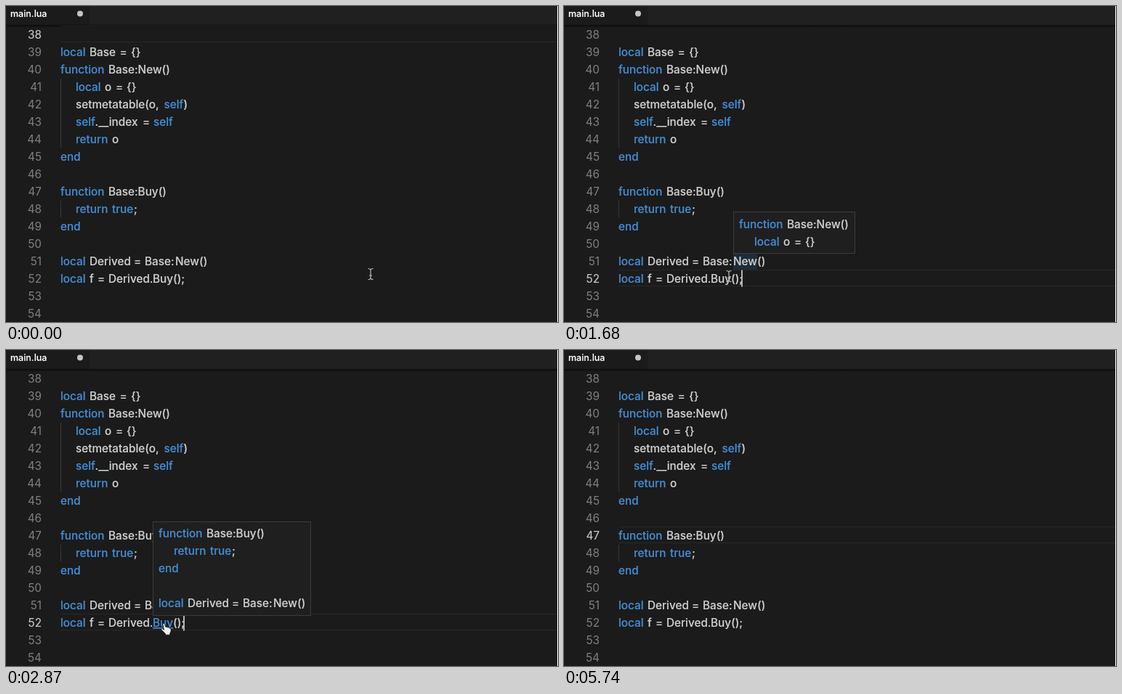
These frames come from a looping animation (760x435 px, 5810 ms). An HTML page:

```html
<!DOCTYPE html>
<html lang="en">
<head>
<meta charset="utf-8">
<title>Lua editor</title>
<style>
  html, body { margin: 0; width: 100%; height: 100%; overflow: hidden; background: #1b1b1b; }
  svg { display: block; width: 760px; height: 435px; }
  text {
    font: 500 15.3px Inter, "Noto Sans CJK SC", sans-serif;
    font-feature-settings: "calt" 0;
    fill: #d0d0d0; stroke: #d0d0d0; stroke-width: .15px; white-space: pre;
  }
  .kw, .link { fill: #458dd6; stroke: #458dd6; }
  .link { text-decoration: underline; }
  .num { font-weight: 400; fill: #808080; stroke: none; text-anchor: end; }
  .num.on { fill: #c8c8c8; stroke: #c8c8c8; }
  .tab { font-size: 12.5px; fill: #fff; stroke: #fff; }
  .guide { stroke: #383838; }
  .band { fill: none; stroke: #272727; }
  .box { fill: #1f1f1f; stroke: #3c3c3c; }
</style>
</head>
<body>
<svg viewBox="0 0 760 435">
  <defs>
    <linearGradient id="shade" x2="0" y2="1">
      <stop stop-color="#0c0c0c"/>
      <stop offset="1" stop-color="#0c0c0c" stop-opacity="0"/>
    </linearGradient>
  </defs>
  <rect width="760" height="435" fill="#1b1b1b"/>
  <rect x="115" width="645" height="27" fill="#202020"/>
  <rect y="26" width="760" height="4" fill="url(#shade)"/>
  <text class="tab" x="6" y="15">main.lua</text>
  <circle cx="102" cy="10.5" r="4" fill="#c4c4c4"/>
  <path id="band" class="band" d="M75 0H759M75 22H759"/>
  <path class="guide" d="M75.5 100V195M75.5 268V291"/>
  <rect id="glow" x="233" y="341" width="33" height="22" fill="#1f2b38"/>
  <g id="code"></g>
  <rect id="caret" width="2" height="23" fill="#b4b4b4"/>
  <g id="tipNew"><rect class="box" x="233.5" y="283.5" width="167" height="57"/></g>
  <g id="tipBuy"><rect class="box" x="202.5" y="236.5" width="217" height="129"/></g>
  <g id="pointer">
    <path id="beam" fill="none" stroke="#bdbdbd" stroke-width="1.2"
      d="M-3.5-7.5Q0-7.5 0-5Q0-7.5 3.5-7.5M0-5V5M-3.5 7.5Q0 7.5 0 5Q0 7.5 3.5 7.5M-2 2H2"/>
    <path id="hand" fill="#eee" stroke="#111" stroke-width=".9" stroke-linejoin="round"
      d="M-1.6.8C-1.9-.9.4-1.3 1 .4L2.5 4.6C3.3 3.6 4.9 4 5.2 5.1C6.2 4.5 7.4 5 7.7 6C8.9 5.7 9.7 6.5 9.7 7.8L9.5 10.8L8.3 13V15.2H2.2L1.6 13.2L-3.3 8.6C-4.5 7.2-2.9 5.9-1.7 6.8L-.1 8Z"/>
  </g>
  <rect x="759" width="1" height="435" fill="#fff"/>
</svg>
<script>
const LOOP = 5810, STEP = 70, JUMP = 2940;
const $ = id => document.getElementById(id);
const baseline = n => 45 + (n - 38) * 24;

// Each piece is "x text"; a leading * marks a keyword.
const lines = {
  39: ["75 *local", "115 Base", "156.5 =", "172 {}"],
  40: ["75 *function", "141 Base:New()"],
  41: ["96 *local", "136 o", "151 =", "166 {}"],
  42: ["96 setmetatable(o,", "217.5 *self", "244.5 )"],
  43: ["96 *self", "122.5 .__index", "188 =", "203 *self"],
  44: ["96 *return", "146 o"],
  45: ["75 *end"],
  47: ["75 *function", "141 Base:Buy()"],
  48: ["96 *return", "146 *true", "176 ;"],
  49: ["75 *end"],
  51: ["75 *local", "115 Derived", "176 =", "191 Base:", "233 New", "266 ()"],
  52: ["75 *local", "115 f", "126 =", "141 Derived.", "202 Buy", "230 ();"]
};

function addText(parent, x, y, str, cls) {
  const el = document.createElementNS("http://www.w3.org/2000/svg", "text");
  el.setAttribute("x", x);
  el.setAttribute("y", y);
  if (cls) el.setAttribute("class", cls);
  el.textContent = str;
  parent.append(el);
  return el;
}

function addLine(parent, n, dx = 0, y = baseline(n)) {
  return (lines[n] || []).map(piece => {
    const [x, str] = piece.split(" ");
    const key = str[0] === "*";
    return addText(parent, +x + dx, y, key ? str.slice(1) : str, key ? "kw" : "");
  });
}

const nums = {}, rows = {};
for (let n = 38; n <= 54; n++) {
  nums[n] = addText($("code"), 49, baseline(n), n, "num");
  rows[n] = addLine($("code"), n);
}
const linkNew = rows[51][4], linkBuy = rows[52][4];

[40, 41].forEach((n, i) => addLine($("tipNew"), n, 166, 306 + 24 * i));
[47, 48, 49, 50, 51].forEach((n, i) => addLine($("tipBuy"), n, 135, 258 + 24 * i));

// time, x, y
const path = [
  [70, 502, 369], [490, 256.5, 351.5], [1470, 256.5, 351.5],
  [1680, 227, 372], [1890, 217.5, 377]
];

function pointerAt(t) {
  const i = path.findIndex(p => p[0] > t);
  if (i === 0) return path[0].slice(1);
  if (i < 0) return path[path.length - 1].slice(1);
  const [t0, x0, y0] = path[i - 1], [t1, x1, y1] = path[i];
  const u = (t - t0) / (t1 - t0), e = u * u * (3 - 2 * u);
  return [x0 + (x1 - x0) * e, y0 + (y1 - y0) * e];
}

const show = (el, on) => el.setAttribute("visibility", on ? "visible" : "hidden");

function draw(now) {
  const t = Math.floor(now % LOOP / STEP) * STEP;
  const within = (a, b) => t >= a && t < b;
  const active = t < 70 ? 38 : t < JUMP ? 52 : 47;
  const y = baseline(active);

  for (const n in nums) nums[n].classList.toggle("on", +n === active);
  $("band").setAttribute("transform", `translate(0 ${y - 17.5})`);

  const blink = active === 52 ? (t - 70) / 350 : (t - JUMP) / 359;
  show($("caret"), active !== 38 && Math.floor(blink) % 2 === 0);
  $("caret").setAttribute("x", active === 52 ? 244 : 140);
  $("caret").setAttribute("y", y - 17.5);

  const onNew = within(560, 1540), onBuy = within(1960, JUMP);
  linkNew.classList.toggle("link", onNew);
  linkBuy.classList.toggle("link", onBuy);
  show($("glow"), within(1540, 1750));
  show($("tipNew"), within(770, 1750));
  show($("tipBuy"), within(2310, JUMP));

  const [px, py] = pointerAt(t);
  $("pointer").setAttribute("transform", `translate(${px} ${py})`);
  show($("hand"), onNew || onBuy);
  show($("beam"), t < JUMP && !onNew && !onBuy);
}

const start = performance.now();
function tick() {
  draw(performance.now() - start);
  requestAnimationFrame(tick);
}
tick();
</script>
</body>
</html>
```
